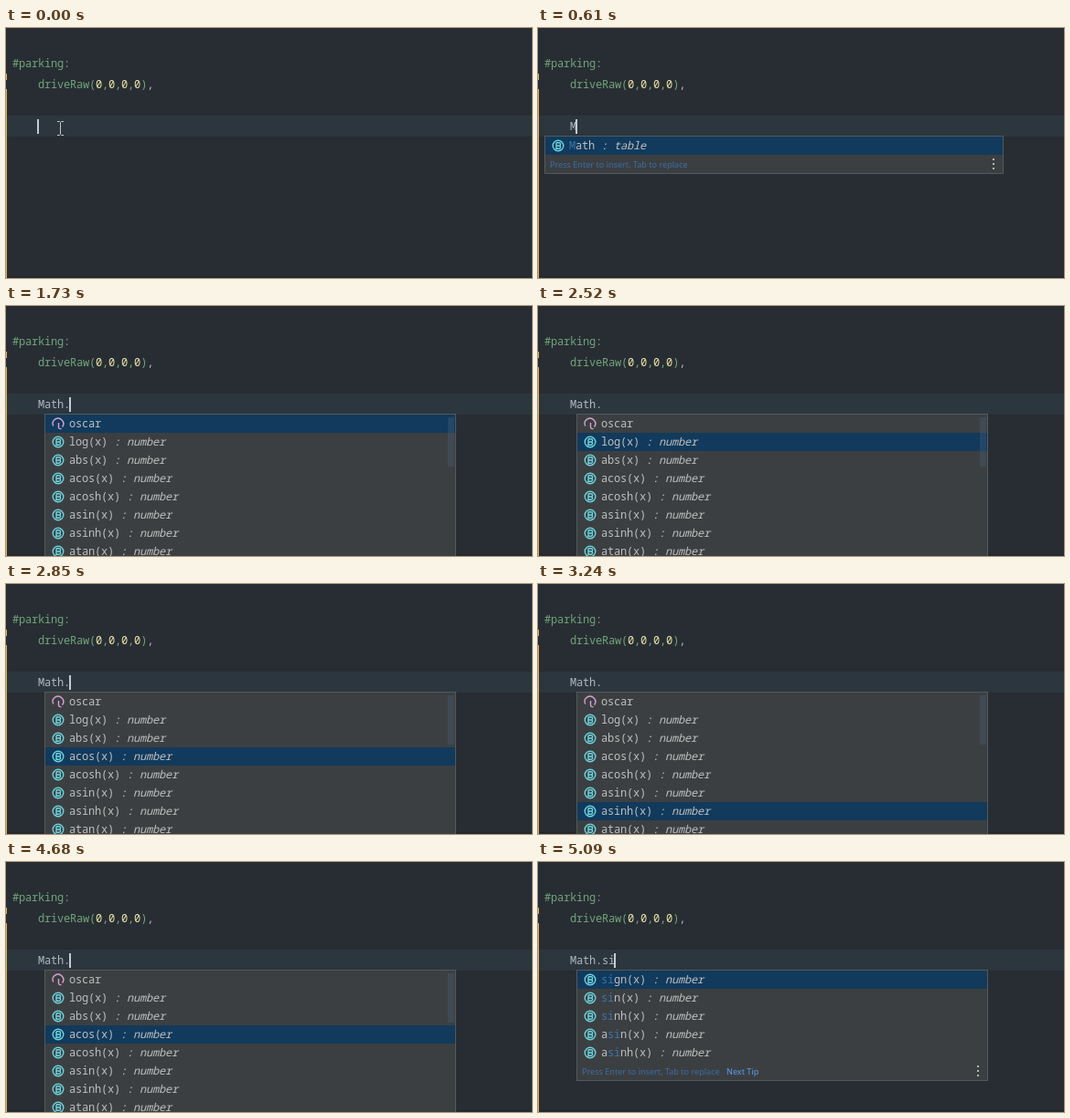
Write an HTML page that moves like this. It is 575 by 274 pixels and loops after 6220 ms.

```html
<!DOCTYPE html>
<html lang="en">
<head>
<meta charset="utf-8">
<title>Code completion</title>
<style>
  html, body { margin: 0; width: 100%; height: 100%; overflow: hidden; background: #282d33; }
  svg { display: block; }
  text { white-space: pre; font: 12px "Noto Sans Mono", "DejaVu Sans Mono", monospace; letter-spacing: -.2px; fill: #b0b7c2; }
  .green { fill: #70a67a; }
  .num { fill: #efe8aa; font-weight: 500; }
  .item { fill: #bfbfbf; }
  .type { font-style: italic; }
  .match { fill: #3a75b0; }
  .hint { font: 9.1px "Noto Sans", "Open Sans", sans-serif; letter-spacing: 0; fill: #3b6da6; }
  .link { fill: #589df6; }
  .icon { fill: none; stroke: #6ad6e0; stroke-width: 1.4; }
  .field { stroke: #d9a0d2; }
</style>
</head>
<body>
<svg width="575" height="274" viewBox="0 0 575 274">
  <rect width="575" height="274" fill="#282d33"/>
  <rect y="272" width="575" height="1" fill="#22262c"/>
  <rect x="1" y="96" width="574" height="23" fill="#2c363e"/>
  <path d="M.5 50v7M.5 67v207" stroke="#e9b450"/>
  <text class="green" x="7" y="43">#parking:</text>
  <text class="green" x="35" y="66">driveRaw(<tspan class="num">0</tspan>,<tspan class="num">0</tspan>,<tspan class="num">0</tspan>,<tspan class="num">0</tspan>)<tspan fill="#b0b7c2">,</tspan></text>
  <text id="typed" x="35" y="112"></text>
  <rect id="caret" y="100" width="2" height="16" fill="#c5cad1"/>
  <path id="mouse" d="M56 102.5h2.5l1 1 1-1H63M59.5 103.5v13M56 117.5h2.5l1-1 1 1H63" fill="none" stroke="#c4c7ca"/>
  <g id="popup"></g>
</svg>
<script>
const LOOP = 6220, TOP = 118, ROW = 20;
const $ = id => document.getElementById(id);
const numeric = names => names.map(n => [n + "(x)", "number"]);

const popups = {
  globals: { x: 7, w: 502, items: [
    ["Math", "table"], ["assert(v)", "any"], ["error(v)", "nil"], ["ipairs(t)", "function"],
    ["next(t)", "any"], ["pairs(t)", "function"], ["print(v)", "nil"], ["type(v)", "string"]] },
  table: { x: 7, w: 502, filtered: true, items: [["Math", "table"]] },
  members: { x: 42, w: 450, items: [["oscar"],
    ...numeric(["log", "abs", "acos", "acosh", "asin", "asinh", "atan"])] },
  sines: { x: 42, w: 450, filtered: true, tip: true,
    items: numeric(["sign", "sin", "sinh", "asin", "asinh"]) }
};

// start time, typed text, caret shown, popup, selected row
const steps = [
  [0, "", 1],
  [80, "", 0, "globals", 0],
  [540, "M", 1, "globals", 0],
  [610, "M", 1, "table", 0],
  [810, "Ma", 1, "table", 0],
  [940, "Mat", 1, "table", 0],
  [1070, "Math", 1, "table", 0],
  [1400, "Math.", 1, "table", 0],
  [1470, "Math.", 1],
  [1730, "Math.", 1, "members", 0],
  [2120, "Math.", 0, "members", 0],
  [2520, "Math.", 0, "members", 1],
  [2650, "Math.", 0, "members", 2],
  [2720, "Math.", 1, "members", 2],
  [2780, "Math.", 1, "members", 3],
  [2910, "Math.", 1, "members", 4],
  [3110, "Math.", 0, "members", 5],
  [3240, "Math.", 0, "members", 6],
  [3370, "Math.", 0, "members", 7],
  [3630, "Math.", 1, "members", 7],
  [4170, "Math.", 0, "members", 6],
  [4300, "Math.", 0, "members", 5],
  [4550, "Math.", 0, "members", 4],
  [4680, "Math.", 1, "members", 3],
  [4950, "Math.s", 1, "members", 3],
  [5020, "Math.si", 1, "members", 3],
  [5090, "Math.si", 1, "sines", 0]
];

const rect = (x, y, w, h, fill) =>
  `<rect x="${x}" y="${y}" width="${w}" height="${h}" fill="${fill}"/>`;

function icon(x, y, isField) {
  const d = isField
    ? "M-5.3 2.5A5.8 5.8 0 1 1 4.5 3.5M.5-1V3.5Q.5 6 3.5 5.5"
    : "M-5.8 0A5.8 5.8 0 1 1 5.8 0A5.8 5.8 0 1 1-5.8 0M-2-3.2V3.2H1A1.6 1.6 0 0 0 1 0H-2M1 0A1.6 1.6 0 0 0 1-3.2H-2";
  return `<path class="icon${isField ? " field" : ""}" transform="translate(${x} ${y})" d="${d}"/>`;
}

function label(name, prefix) {
  const at = prefix ? name.indexOf(prefix) : -1;
  if (at < 0) return name;
  const end = at + prefix.length;
  return `${name.slice(0, at)}<tspan class="match">${name.slice(at, end)}</tspan>${name.slice(end)}`;
}

function drawPopup({ x, w, items, filtered, tip }, selected, typed) {
  const bottom = TOP + 1 + items.length * ROW;
  const height = filtered ? bottom + ROW + 1 - TOP : 180;
  const prefix = filtered ? typed.match(/\w+(?=\.?$)/)[0] : "";
  let out = rect(x, TOP, w, height, "#55595c") + rect(x + 1, TOP + 1, w - 2, height - 2, "#3c3f41");
  out += rect(x + 1, TOP + 1 + selected * ROW, w - 2, ROW, "#113a5c");
  items.forEach(([name, type], i) => {
    const y = TOP + 11 + i * ROW;
    const suffix = type ? `<tspan class="type"> : ${type}</tspan>` : "";
    out += icon(x + 15, y, !type);
    out += `<text class="item" x="${x + 27}" y="${y + 4}">${label(name, prefix)}${suffix}</text>`;
  });
  if (!filtered) return out + rect(x + w - 9, 122, 7, 54, "rgba(75,100,130,.3)");

  const hint = (dx, text, cls) => `<text class="hint ${cls}" x="${x + dx}" y="${bottom + 14}">${text}</text>`;
  out += hint(6, "Press Enter to insert, Tab to replace", "");
  if (tip) out += hint(164, "Next Tip", "link");
  for (const dy of [4, 9, 14]) out += rect(x + w - 12, bottom + dy, 2, 2, "#b4b6b8");
  return out;
}

let shown;
function frame() {
  const t = performance.now() % LOOP;
  const step = steps.findLast(s => s[0] <= t);
  if (step !== shown) {
    shown = step;
    const [start, typed, caret, popup, selected] = step;
    $("typed").textContent = typed;
    $("caret").setAttribute("x", 34 + typed.length * 7);
    $("caret").style.opacity = caret;
    $("mouse").style.opacity = start === 0 ? 1 : 0;
    $("popup").innerHTML = popup ? drawPopup(popups[popup], selected, typed) : "";
  }
  requestAnimationFrame(frame);
}
frame();
</script>
</body>
</html>
```
